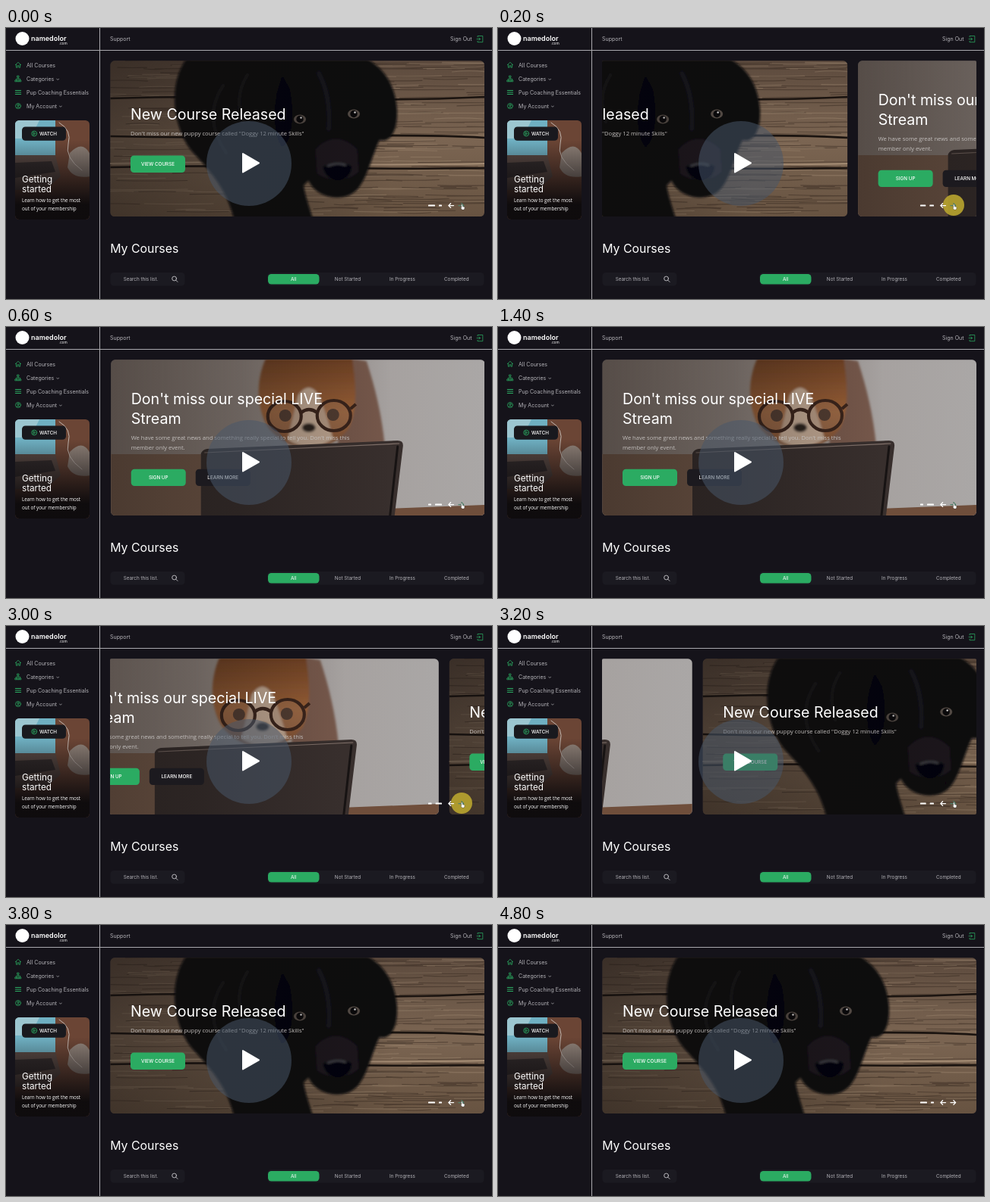
An HTML page that plays this animation: 640x358 px, repeating every 5 s.

```html
<!DOCTYPE html>
<html lang="en">
<head>
<meta charset="utf-8">
<title>Course dashboard</title>
<style>
html, body { margin: 0; width: 100%; height: 100%; overflow: hidden; background: #15131a; }
svg { display: block; width: 100vw; height: 100vh; }
text { font-family: Inter, sans-serif; fill: #fff; }
.copy { font-family: "Open Sans", sans-serif; font-size: 7.6px; fill: #c3bfbd; }
.title { font-size: 19.6px; }
.cta { font-size: 6.3px; font-weight: 500; text-anchor: middle; }
.nav text { font-size: 7.05px; fill: #b4b3b8; }
.tabs text { font-size: 6.35px; fill: #b4b3b8; text-anchor: middle; }
.line { fill: none; stroke-linecap: round; stroke-linejoin: round; }
</style>
</head>
<body>
<svg viewBox="0 0 640 358" preserveAspectRatio="none">
  <defs>
    <clipPath id="stage"><rect x="137" y="43" width="493" height="206" rx="2"/></clipPath>
    <clipPath id="frame"><rect x="137.5" y="43.3" width="492.5" height="205.7" rx="5.5"/></clipPath>
    <clipPath id="card"><rect x="12" y="122" width="98" height="131" rx="5.5"/></clipPath>
    <linearGradient id="shade">
      <stop offset="0" stop-color="#100d0d" stop-opacity=".45"/>
      <stop offset=".35" stop-color="#100d0d" stop-opacity=".3"/>
      <stop offset=".75" stop-color="#100d0d" stop-opacity="0"/>
    </linearGradient>
    <linearGradient id="wall">
      <stop offset="0" stop-color="#8f8178"/>
      <stop offset=".5" stop-color="#948a84"/>
      <stop offset=".68" stop-color="#a5a09e"/>
      <stop offset="1" stop-color="#aaa7a6"/>
    </linearGradient>
    <linearGradient id="wood" x2="0" y2="1">
      <stop offset="0" stop-color="#5c4a3d"/>
      <stop offset=".5" stop-color="#7b6552"/>
      <stop offset="1" stop-color="#675341"/>
    </linearGradient>
    <linearGradient id="fur" x2="0" y2="1">
      <stop offset="0" stop-color="#6d3f22"/>
      <stop offset=".6" stop-color="#9c6238"/>
      <stop offset="1" stop-color="#7d5236"/>
    </linearGradient>
    <linearGradient id="fade" x2="0" y2="1">
      <stop offset=".2" stop-color="#0c0a0c" stop-opacity="0"/>
      <stop offset=".85" stop-color="#0c0a0c" stop-opacity=".97"/>
    </linearGradient>
    <filter id="soft"><feGaussianBlur stdDeviation="1.5"/></filter>
  </defs>

  <g clip-path="url(#stage)">
    <g id="track">
      <g id="dog">
        <g clip-path="url(#frame)">
          <path d="M137 43h494v207h-494z" fill="url(#wood)"/>
          <path id="grain" class="line" stroke="#2b2019" stroke-opacity=".42" stroke-width="1.1"/>
          <path id="shine" class="line" stroke="#b39b82" stroke-opacity=".3" stroke-width="1.1"/>
          <path d="M137 93q120 -4 250 0t244 -2M137 143q130 3 270 0t224 2M137 184q160 -3 260 0t234 1" class="line" stroke="#1b1410" stroke-width="2.6"/>
          <path d="M137 179q160 -3 260 0t234 0" class="line" stroke="#a28a72" stroke-width="2"/>
          <g filter="url(#soft)">
            <path d="M238 40C214 72 218 128 244 162C266 186 290 210 300 252H404C398 232 394 222 392 208L470 130V40Z" fill="#08080b"/>
            <path d="M362 40C350 80 362 130 382 160C390 178 394 204 410 216C426 227 450 227 463 213C477 196 482 168 492 148C506 152 516 136 515 108C513 78 500 54 474 40Z" fill="#0e0d11"/>
            <path d="M474 43C492 66 490 112 494 148C509 151 517 128 514 104C511 76 497 55 474 43Z" fill="#08080a"/>
            <path d="M364 62C351 92 350 140 364 158C379 145 380 110 374 80Z" fill="#060608"/>
            <path d="M408 160Q434 134 462 160L464 190Q438 210 410 192Z" fill="#1a191d"/>
            <path d="M412 60Q428 90 425 133" class="line" stroke="#19191d" stroke-width="5"/>
            <path d="M286 76Q258 118 290 165M318 62Q300 90 312 124" class="line" stroke="#121216" stroke-width="5"/>
            <path d="M417 183Q436 173 455 182Q456 198 437 202Q420 199 417 183Z" fill="#060608"/>
            <path d="M424 182q12 -5 23 -1" class="line" stroke="#4c4c52" stroke-width="2"/>
            <path d="M437 202v5q-14 9 -22 1M437 207q14 7 22 -1" class="line" stroke="#050506" stroke-width="2"/>
          </g>
          <g fill="#564d47"><ellipse cx="387" cy="120.5" rx="8" ry="6"/><ellipse cx="458" cy="113.5" rx="8" ry="6"/></g>
          <g fill="#09080a"><circle cx="387" cy="120.5" r="4.7"/><circle cx="458" cy="113.5" r="4.7"/></g>
          <g fill="#d5d3d2"><circle cx="388.5" cy="118.5" r="1.3"/><circle cx="459.5" cy="111.5" r="1.3"/></g>
          <path d="M137 43h494v207h-494z" fill="url(#shade)"/>
          <text x="164" y="121" class="title">New Course Released</text>
          <text x="164" y="142.4" class="copy">Don't miss our new puppy course called "Doggy 12 minute Skills"</text>
          <rect x="164" y="168.5" width="72" height="22.5" rx="4.5" fill="#2bab62"/>
          <text x="200" y="182.2" class="cta">VIEW COURSE</text>
        </g>
      </g>

      <g transform="translate(506.5)">
        <g clip-path="url(#frame)">
          <path d="M137 43h494v207h-494z" fill="url(#wall)"/>
          <path d="M137 168h120v82h-120z" fill="#7b5f4d"/>
          <path d="M500 240L631 235V250H500Z" fill="#6f4e3b"/>
          <g filter="url(#soft)">
            <path d="M446 40L474 45C486 82 494 116 498 156H436Z" fill="#76594b"/>
            <path d="M342 40C327 72 329 112 347 136Q370 160 400 160T451 134C464 102 459 68 455 40Z" fill="url(#fur)"/>
            <path d="M384 90Q398 70 411 90Q423 120 430 148Q400 168 370 149Q377 120 384 90Z" fill="#c0a792"/>
            <ellipse cx="398" cy="133" rx="9" ry="6" fill="#2a211f"/>
          </g>
          <g fill="#31221d"><circle cx="367" cy="117" r="8"/><circle cx="430" cy="116" r="8"/></g>
          <g fill="#9b7962" fill-opacity=".3" stroke="#3a241b" stroke-width="4.2">
            <ellipse cx="366" cy="118" rx="22" ry="20"/><ellipse cx="431" cy="117" rx="22" ry="20"/>
            <path d="M388 113q10 -8 21 0M453 108l7 -6" fill="none"/>
          </g>
          <path d="M256 167Q258 162 264 161L515 150Q523 150 522 158L511 249H256Z" fill="#382f2d"/>
          <path d="M261 166L517 154" class="line" stroke="#81716a" stroke-width="1.2"/>
          <path d="M515 158L505 249" class="line" stroke="#171313" stroke-width="3"/>
          <path d="M137 43h494v207h-494z" fill="url(#shade)"/>
          <text x="164" y="102" class="title">Don't miss our special LIVE</text>
          <text x="164" y="127.6" class="title">Stream</text>
          <text x="164" y="149" class="copy">We have some great news and something really special to tell you. Don't miss this</text>
          <text x="164" y="161.5" class="copy">member only event.</text>
          <rect x="164" y="187.7" width="72" height="22.3" rx="4.5" fill="#2bab62"/>
          <text x="200" y="201.2" class="cta">SIGN UP</text>
          <rect x="249" y="187.7" width="72" height="22.3" rx="4.5" fill="#1c1a1f"/>
          <text x="285" y="201.2" class="cta">LEARN MORE</text>
        </g>
      </g>
      <use href="#dog" x="1013"/>
    </g>
  </g>

  <g fill="#fff">
    <rect id="dotA" x="556" y="233.6" height="2" rx=".6"/>
    <rect id="dotB" y="233.6" height="2" rx=".6"/>
  </g>
  <circle id="press" cx="600" cy="234" r="14" fill="#b9a52f" fill-opacity=".9"/>
  <g class="line" stroke="#fff" stroke-width="1.3">
    <path d="M589.5 234.6h-6.7m2.8 -2.8l-2.8 2.8l2.8 2.8"/>
    <path id="next" d="M596 234.6h6.7m-2.8 -2.8l2.8 2.8l-2.8 2.8"/>
  </g>
  <path id="hand" d="M599.5 233.5q1 -1 1.6 .2l.3 2.1l2.2 .7q.7 .4 .3 1.6l-.7 2h-2.6l-1.9 -2.6q.3 -.8 1.2 0z" fill="#fff" stroke="#333" stroke-width=".35"/>

  <circle cx="320" cy="179" r="56" fill="#48586a" fill-opacity=".53"/>
  <path d="M312 166L333 178.3L312 190.5Z" fill="#fff" stroke="#fff" stroke-width="2" stroke-linejoin="round"/>

  <path d="M0 29.5H640M123.5 0V358" stroke="#aaa9ae" stroke-width="1"/>
  <circle cx="21.5" cy="14" r="9" fill="#fff"/>
  <text x="33" y="16.8" font-size="9" font-weight="600">namedolor</text>
  <text x="69.5" y="21.6" font-size="4.8">.com</text>

  <g class="nav">
    <text x="137" y="17.2">Support</text>
    <text x="585" y="17.2">Sign Out</text>
    <text x="27" y="51.7">All Courses</text>
    <text x="27" y="69.7">Categories</text>
    <text x="27" y="87.6">Pup Coaching Essentials</text>
    <text x="27" y="105.5">My Account</text>
  </g>
  <path d="M66.8 67.4l1.4 1l1.4 -1M70.5 103.2l1.4 1l1.4 -1" class="line" stroke="#b4b3b8" stroke-width=".7"/>
  <g class="line" stroke="#2bab62" stroke-width=".75">
    <path d="M621 12v-1.5h6.8v8.2h-6.8v-1.5M620 14.6h4.5m-1.6 -1.6l1.6 1.6l-1.6 1.6"/>
    <path d="M12.3 48.8l3.7 -3.5l3.7 3.5M13.4 48.2v4h1.7v-2.5h1.8v2.5h1.7v-4"/>
    <path d="M15 63.2h2v2h-2zM16 65.2v2M13.3 69v-1.8h5.4V69M12.2 69h2v1.8h-2zM15 69h2v1.8h-2zM17.8 69h2v1.8h-2z"/>
    <path d="M12.4 82.5h7.2M12.4 85h7.2M12.4 87.5h7.2" stroke-width="1.1"/>
    <circle cx="16" cy="103" r="3.5"/><circle cx="16" cy="102" r="1.2"/><path d="M13.8 105.4q2.2 -2.6 4.4 0"/>
  </g>

  <g clip-path="url(#card)">
    <path d="M12 122h98v131h-98z" fill="#6b4535"/>
    <path d="M12 122h53v46h-53z" fill="#6fb0c2"/>
    <path d="M12 122h32l-12 24h-20z" fill="#9cc6d0"/>
    <path d="M12 168h53l7 28l-20 18h-40z" fill="#5a4a44"/>
    <path d="M12 178l48 -2l5 14l-53 8z" fill="#332c2c"/>
    <path d="M84 165q17 -18 27 2v29q-23 4 -30 -12z" fill="#8f8178"/>
    <path d="M70 125q17 10 12 28t18 35" class="line" stroke="#c2b7b0" stroke-width="1"/>
    <path d="M12 122h98v131h-98z" fill="url(#fade)"/>
  </g>
  <rect x="21" y="130.5" width="58" height="18.3" rx="4.5" fill="#19191e"/>
  <g class="line" stroke="#2bab62" stroke-width=".9"><circle cx="37.2" cy="139.5" r="3.4"/><path d="M36.4 138l2.3 1.5l-2.3 1.5z"/></g>
  <text x="55.5" y="141.8" class="cta" font-weight="600">WATCH</text>
  <text x="21" y="203.8" font-size="11.7">Getting</text>
  <text x="21" y="217.3" font-size="11.7">started</text>
  <text x="21" y="230.2" class="copy" style="font-size:6.3px;fill:#fff">Learn how to get the most</text>
  <text x="21" y="240.6" class="copy" style="font-size:6.3px;fill:#fff">out of your membership</text>

  <text x="137.2" y="297" font-size="15.85">My Courses</text>
  <g fill="#1b1a21">
    <rect x="137.5" y="323" width="98" height="17.5" rx="4.5"/>
    <rect x="344.5" y="323" width="285" height="17.5" rx="4.5"/>
  </g>
  <rect x="345" y="325" width="67.5" height="13.6" rx="4.5" fill="#2bab62"/>
  <g class="tabs">
    <text x="177.5" y="334">Search this list.</text>
    <text x="378.7" y="334" style="fill:#fff">All</text>
    <text x="450" y="334">Not Started</text>
    <text x="522" y="334">In Progress</text>
    <text x="593.3" y="334">Completed</text>
  </g>
  <g class="line" stroke="#c9c8cc" stroke-width=".9"><circle cx="221.6" cy="331" r="2.9"/><path d="M223.8 333.2l2.2 2.2"/></g>
</svg>
<script>
const $ = id => document.getElementById(id);
const STRIDE = 506.5, LOOP = 5000, STEP = 200;

let seed = 7;
const rand = () => (seed = seed * 16807 % 2147483647) / 2147483647;

function streaks(count) {
  let d = '';
  for (let i = 0; i < count; i++) {
    const x = 120 + rand() * 490, y = 43 + rand() * 206, w = 30 + rand() * 90;
    d += `M${x} ${y}q${w / 2} ${rand() * 5 - 2.5} ${w} 0`;
  }
  return d;
}
$('grain').setAttribute('d', streaks(150));
$('shine').setAttribute('d', streaks(120));

// CSS "ease": cubic-bezier(.25, .1, .25, 1), solved by bisection
const bezier = (a, b, u) => 3 * a * u * (1 - u) ** 2 + 3 * b * u * u * (1 - u) + u ** 3;
function ease(x) {
  if (x <= 0) return 0;
  if (x >= 1) return 1;
  let lo = 0, hi = 1;
  for (let i = 0; i < 24; i++) {
    const mid = (lo + hi) / 2;
    if (bezier(.25, .25, mid) < x) lo = mid; else hi = mid;
  }
  return bezier(.1, 1, lo);
}

const show = (id, on) => $(id).setAttribute('visibility', on ? 'visible' : 'hidden');

function draw() {
  const t = Math.floor(performance.now() % LOOP / STEP) * STEP;
  const first = ease((t - 81) / 547), second = ease((t - 2930) / 610);
  $('track').setAttribute('transform', `translate(${-STRIDE * (first + second)})`);

  const shift = 5 * (first - second);
  $('dotA').setAttribute('width', 9 - shift);
  $('dotB').setAttribute('x', 570 - shift);
  $('dotB').setAttribute('width', 4 + shift);

  show('press', t === 200 || t === 3000);
  show('hand', t < 4200);
  $('next').setAttribute('stroke', t < 4200 ? '#4f8069' : '#fff');
  requestAnimationFrame(draw);
}
draw();
</script>
</body>
</html>
```
